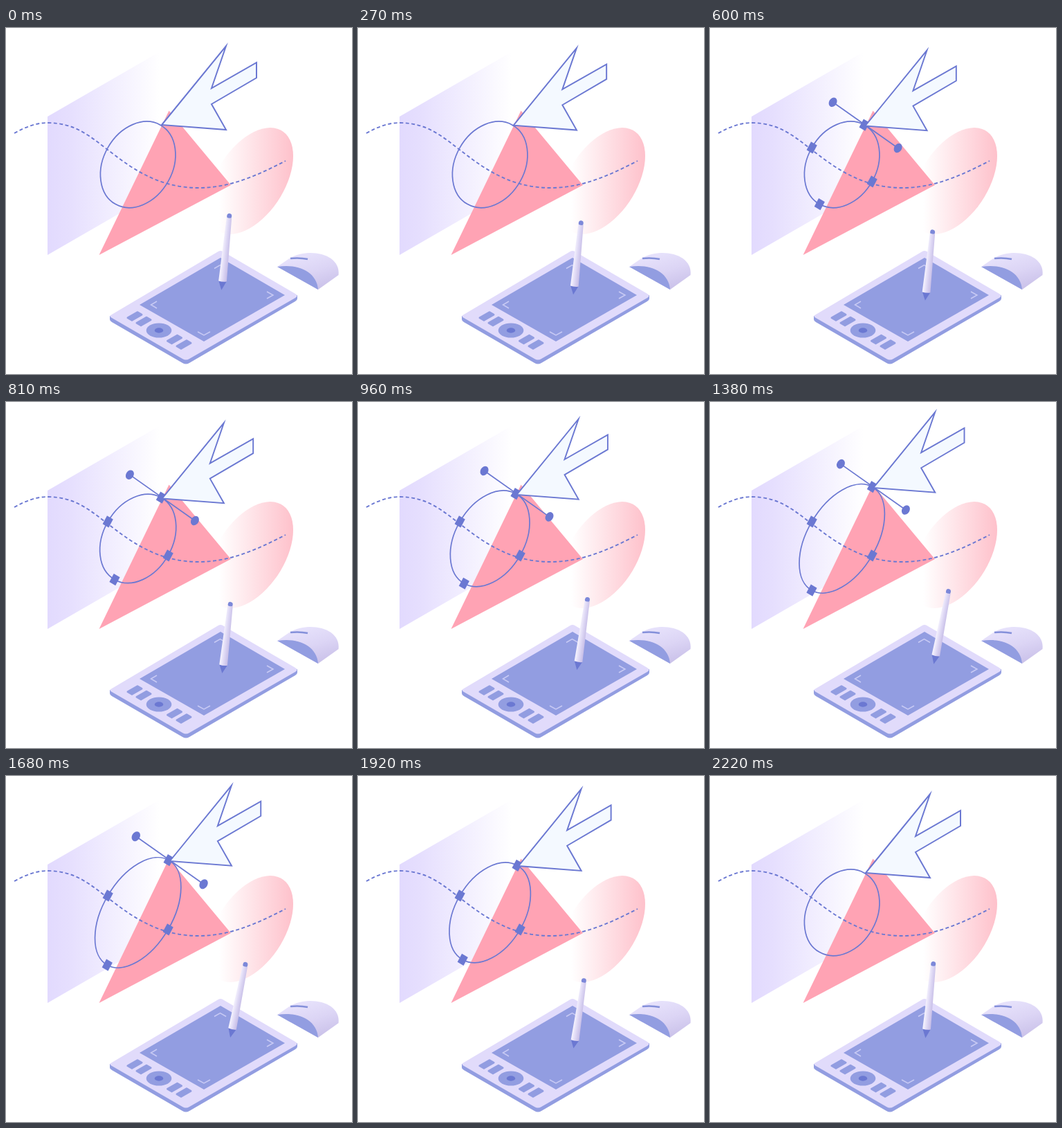
Write an HTML page that moves like this. It is 500x500 px and loops after 2.25 s.

```html
<!DOCTYPE html>
<html lang="en">
<head>
<meta charset="utf-8">
<title>Drawing tools</title>
<style>
  html, body { margin: 0; width: 100%; height: 100%; overflow: hidden; background: #fff; }
  svg { display: block; width: 100%; height: 100%; }
  .line { fill: none; stroke: #6b78d2; stroke-width: 1.7; vector-effect: non-scaling-stroke; }
  .dark { fill: #6b78d2; }
  .mid { fill: #929de1; }
  .pale { fill: #e1dbfb; }
  .mark { fill: none; stroke: #c8caf4; stroke-width: 1.5; }
  .key { fill: #929de1; stroke: #929de1; stroke-width: 3; stroke-linejoin: round; }
</style>
</head>
<body>
<svg viewBox="0 0 500 500">
  <defs>
    <linearGradient id="wall">
      <stop offset="0" stop-color="#e2dafe"/>
      <stop offset=".2" stop-color="#e6dffe"/>
      <stop offset="1" stop-color="#fff"/>
    </linearGradient>
    <linearGradient id="blush">
      <stop offset=".14" stop-color="#fff"/>
      <stop offset="1" stop-color="#fec1cb"/>
    </linearGradient>
    <linearGradient id="shell" x1=".35" y1=".1" x2=".8" y2="1">
      <stop offset="0" stop-color="#e6e1fb"/>
      <stop offset=".45" stop-color="#dcd5f5"/>
      <stop offset="1" stop-color="#c8bfe8"/>
    </linearGradient>
    <linearGradient id="barrel">
      <stop offset=".1" stop-color="#f3f0fd"/>
      <stop offset=".5" stop-color="#ddd7f4"/>
      <stop offset="1" stop-color="#c5bce6"/>
    </linearGradient>
    <path id="key" class="key" d="M4-5.7 10-2.3-4 5.7-10 2.3Z"/>
    <path id="node" class="dark" d="M7.6-3.4-1.2-8.6-7.6 3.4 1.2 8.6Z"/>
    <circle id="knob" class="dark" r="1" transform="matrix(4.8 2.7 -3.6 6.2 0 0)"/>
  </defs>

  <path fill="url(#wall)" d="M60 128 222 34.5V234.5L60 328Z"/>
  <circle r="1" fill="url(#blush)" transform="matrix(62 -36 0 68 353 221)"/>
  <path fill="#ffa3b4" d="M235.5 119.5 325 227 134.5 328Z"/>
  <path class="line" stroke-dasharray="5 3.5" style="stroke-width:1.9"
    d="M12 152C28 143 44 137 60 137C100 137 122 157 147 176C175 197 215 231 278 231C325 231 365 212 404 192"/>

  <circle id="ring" class="line" r="1"/>
  <g id="handle">
    <path class="line" d="M-45.5-33 48.5 33.3"/>
    <use href="#knob" x="0" y="0" transform="translate(-45.5 -33)"/>
    <use href="#knob" x="0" y="0" transform="translate(48.5 33.3)"/>
  </g>
  <g id="nodes"><use href="#node"/><use href="#node"/><use href="#node"/><use href="#node"/></g>
  <path id="cursor" d="M0 0 93-114 72-53 137-90V-68L72-30 93 7Z"
    fill="#f4f9ff" stroke="#6b78d2" stroke-width="2" stroke-miterlimit="10"/>

  <path class="mid" d="M150 416V421Q150 423.500 153 425L255 484Q260 487 265 484L418 395Q421 393 421 391V386L260 440Z"/>
  <path class="pale" d="M153 414 305 324Q310 320 315 324L418 384Q423 387 418 390L265 478Q260 481 255 478L153 419Q148 416.500 153 414Z"/>
  <path class="mid" d="M193 400 310 332 403 386 286 453Z"/>
  <path class="mark" d="M301 347.500 309.500 342.500 318 347.500M377 381 386 386 377 391M218 395 209.500 400 218 405M277 439 286 444 295 439"/>
  <use href="#key" x="186" y="416.500"/>
  <use href="#key" x="199" y="424"/>
  <use href="#key" x="243.500" y="450"/>
  <use href="#key" x="257" y="457.500"/>
  <ellipse class="mid" cx="221" cy="437" rx="18.300" ry="10.600"/>
  <ellipse class="dark" cx="221" cy="437" rx="6.300" ry="3.700"/>

  <path fill="url(#shell)" d="M392 345 411 332C438 317 484 326 480.500 357L451 378Z"/>
  <path class="mid" d="M392 345C422 340 449 352 451 378Z"/>
  <path d="M411 333Q424 331.500 436 334" fill="none" stroke="#8490da" stroke-width="2.600"/>

  <g id="pen">
    <path class="dark" d="M-5.800-.5H5.800L-.4 12.800Z"/>
    <ellipse cx="0" cy="-94.500" rx="3.500" ry="4" fill="#7c88d9"/>
    <path fill="url(#barrel)" d="M-3.700-92.500Q0-91 3.700-92.500L5.900 0Q0 1.500-5.900 0Z"/>
  </g>
</svg>
<script>
const LOOP = 2250;
const $ = id => document.getElementById(id);
const place = (el, x, y, rest = '') => el.setAttribute('transform', `translate(${x} ${y}) ${rest}`);

const sine = x => (1 - Math.cos(Math.PI * x)) / 2;
const linear = x => x;

// Cubic bezier easing with end handles at heights 0 and 1.
function drag(x) {
  let lo = 0, hi = 1;
  for (let i = 0; i < 24; i++) {
    const t = (lo + hi) / 2, u = 1 - t;
    if (3 * u * u * t * 0.42 + 3 * u * t * t * 0.23 + t * t * t < x) lo = t; else hi = t;
  }
  return lo * lo * (3 - 2 * lo);
}

// Each step: time, values, easing used to arrive there.
const tracks = {
  stretch: [[600, [0]], [1680, [1], drag], [2220, [0], sine]],
  cursor: [[0, [225, 140, 1]], [570, [224.3, 141.5, .96], sine],
    [600, [224.3, 141.5, .96], linear], [1680, [236.7, 123, .96], drag], [2220, [225, 140, 1], sine]],
  pen: [[0, [313, 366, 5.9, 1]], [585, [312.5, 382, 6, .925], sine],
    [600, [312.5, 382, 6, .925], linear], [1680, [327, 365.5, 11.5, 1], drag],
    [1920, [313.5, 382, 8.5, .92], sine], [2220, [313, 366, 5.9, 1], sine]],
  nodes: [[120, [0]], [330, [1], sine], [1940, [1], linear], [2190, [0], sine]],
  handle: [[300, [0]], [540, [1], sine], [1560, [1], linear], [1680, [1.04], sine], [1935, [0], sine]]
};

function at(track, t) {
  const i = track.findIndex(step => step[0] > t);
  if (i < 0) return track[track.length - 1][1];
  if (i === 0) return track[0][1];
  const [t0, from] = track[i - 1], [t1, to, ease] = track[i];
  const k = ease((t - t0) / (t1 - t0));
  return from.map((v, n) => v + (to[n] - v) * k);
}

const ring = $('ring'), handle = $('handle'), cursor = $('cursor'), pen = $('pen');
const nodes = [...$('nodes').children];
const cx = 190.7, cy = 197.4, bx = 43.5, by = 24.5;

function draw(t) {
  const [p] = at(tracks.stretch, t);
  const ax = 32.4 + 12 * p, ay = -57.2 - 18.6 * p;
  ring.setAttribute('transform', `matrix(${bx} ${by} ${-ax} ${-ay} ${cx} ${cy})`);

  const [size] = at(tracks.nodes, t);
  [[ax, ay], [-ax, -ay], [bx, by], [-bx, -by]].forEach(([x, y], i) =>
    place(nodes[i], cx + x, cy + y, `scale(${size})`));
  place(handle, cx + ax, cy + ay, `scale(${at(tracks.handle, t)[0]})`);

  const [x, y, s] = at(tracks.cursor, t);
  place(cursor, x, y, `scale(${s})`);

  const [px, py, angle, len] = at(tracks.pen, t);
  place(pen, px, py, `rotate(${angle}) scale(1 ${len})`);
}

function tick() {
  draw(performance.now() % LOOP);
  requestAnimationFrame(tick);
}
tick();
</script>
</body>
</html>
```
